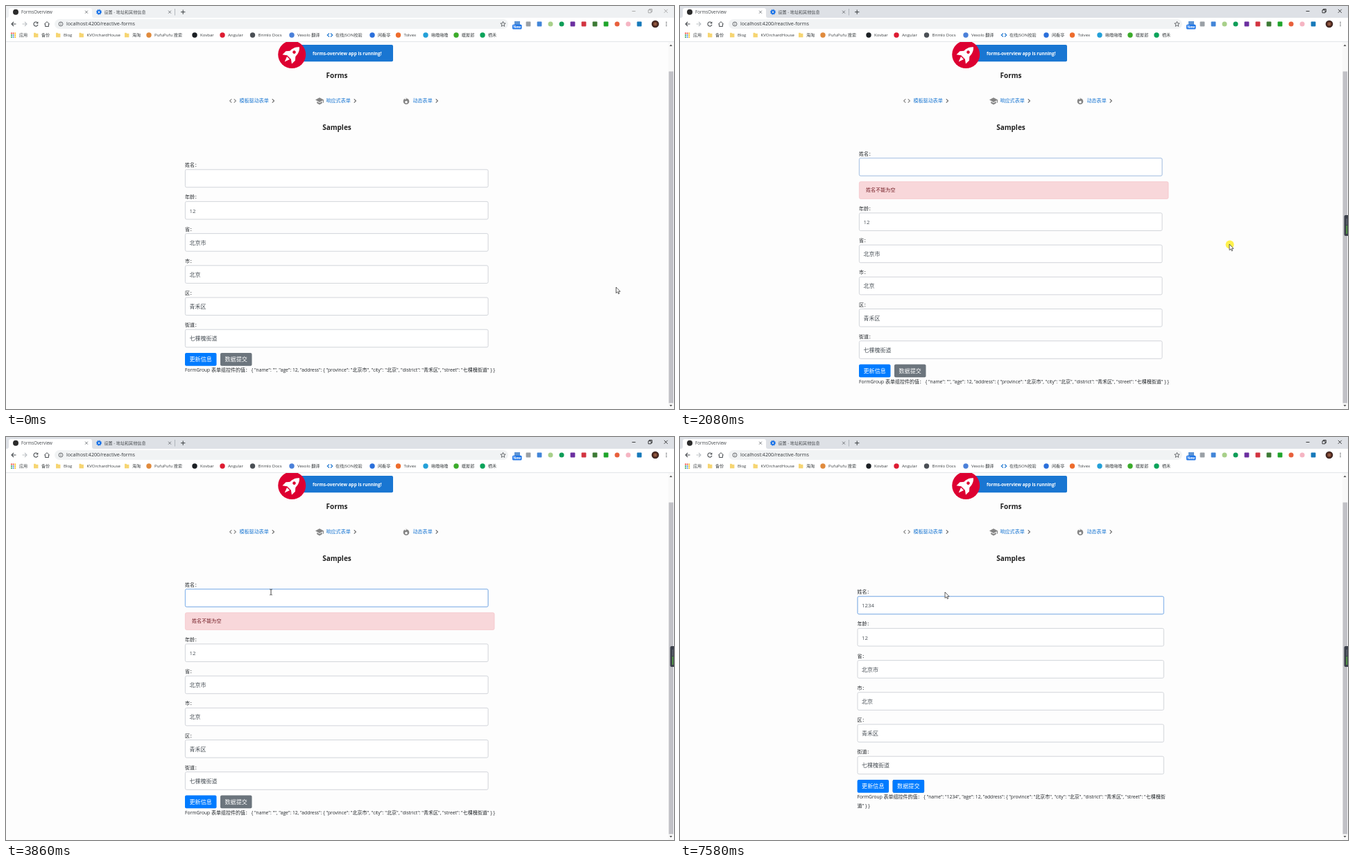
Recreate the animation shown at these times as an HTML page. Size 963x582 px, loop 8000 ms.

```html
<!DOCTYPE html>
<html lang="zh-CN">
<head>
<meta charset="utf-8">
<title>Reactive form validation</title>
<style>
  html, body { margin: 0; width: 100%; height: 100%; overflow: hidden; background: #fdfdfd; }
  svg { display: block; }
  text { font-family: "Open Sans", "Noto Sans", sans-serif; }
  .cjk { font-family: "Noto Sans CJK SC", "Noto Sans CJK", sans-serif; }
</style>
</head>
<body>
<svg id="stage" width="963" height="582" viewBox="0 0 963 582"></svg>
<script>
const LOOP = 8000;
const $ = id => document.getElementById(id);

// ---- drawing helpers -------------------------------------------------
const rect = (x, y, w, h, fill, more = '') =>
  `<rect x="${x}" y="${y}" width="${w}" height="${h}" fill="${fill}" ${more}/>`;
const disc = (x, y, r, fill, more = '') =>
  `<circle cx="${x}" cy="${y}" r="${r}" fill="${fill}" ${more}/>`;
const line = (d, color, width = 1, more = '') =>
  `<path d="${d}" fill="none" stroke="${color}" stroke-width="${width}" ${more}/>`;
const shape = (d, fill, more = '') => `<path d="${d}" fill="${fill}" ${more}/>`;
const at = (x, y, inner, id = '') => `<g ${id && `id="${id}"`} transform="translate(${x} ${y})">${inner}</g>`;

const runs = (str, cjkSize) => str.replace(/[\u3000-\u9fff\uff00-\uffef]+/g,
  s => `<tspan class="cjk" font-size="${cjkSize}">${s}</tspan>`);
// y is the middle of the line
const text = (x, y, str, size, cjkSize, fill, more = '') =>
  `<text x="${x}" y="${y + size * 0.37}" font-size="${size}" fill="${fill}" ${more}>${runs(str, cjkSize)}</text>`;

// ---- browser frame ---------------------------------------------------
function tabs() {
  const close = x => line(`M${x - 2} 6.7l4 4m0-4l-4 4`, '#5f6368', 0.8);
  return rect(0, 0, 963, 17, '#eff1f3', 'id="strip"') +
    shape('M1 17Q4 17 4 14V6Q4 3 7 3H121Q124 3 124 6V14Q124 17 127 17Z', '#fff') +
    disc(14, 8.7, 4, '#2b2b2b') +
    text(22, 8.7, 'FormsOverview', 6.2, 6.2, '#45494d') + close(116) +
    disc(134, 8.7, 2.2, 'none', 'stroke="#1a73e8" stroke-width="2"') +
    disc(134, 8.7, 3.6, 'none', 'stroke="#1a73e8" stroke-width="1" stroke-dasharray="1.4 1.43"') +
    text(141.5, 8.7, '设置 - 地址和其他信息', 6.1, 6.1, '#45494d') + close(236) +
    line('M243.5 4v9.5', '#9aa0a6', 0.7) +
    line('M252 8.7h6.4m-3.2-3.2v6.4', '#3c4043', 1) +
    `<g id="controls" fill="none" stroke-width=".8">
      <path d="M902.5 7.5h5M926 5.8h4v4h-4zM927.3 5.8v-1.3h4v4h-1.3M948.8 4.8l5 5m0-5l-5 5"/></g>`;
}

function toolbar() {
  const ink = '#4c5054';
  const extensions = [
    ['s', 753, '#9aa0a6'], ['s', 769, '#4285d8'], ['c', 785, '#a8d08a'], ['c', 801, '#0f9d58'],
    ['s', 817, '#6b2fa0'], ['s', 833, '#d23440'], ['s', 849, '#3d7a35'], ['s', 865, '#1fa52b'],
    ['c', 881, '#e8603c'], ['c', 897, '#f5b5c3'], ['s', 913, '#1779ba']];
  return rect(0, 17, 963, 18, '#fff') +
    rect(70, 19, 654, 14, '#f1f3f4', 'rx="7"') +
    line('M14.5 26H8m3-3l-3 3 3 3', ink, 1.1) +
    line('M23.5 26H30m-3-3l3 3-3 3', '#bdc1c6', 1.1) +
    line('M45.4 24A3.1 3.1 0 1 0 46 27', ink, 1.1) + shape('M46.4 22.4v3h-3z', ink) +
    line('M55.2 26.2L59 22.7l3.8 3.5M56.5 25.5v4h5v-4', ink, 1) +
    disc(79, 26, 3, 'none', `stroke="${ink}" stroke-width=".8"`) + line('M79 25.6v2m0-3.6v.9', ink, 0.8) +
    text(87, 25.8, 'localhost:4200/reactive-forms', 7.15, 7.15, '#33373b') +
    shape('M716.5 22.4l1 2.5 2.7.2-2.1 1.7.7 2.6-2.3-1.4-2.3 1.4.7-2.6-2.1-1.7 2.7-.2z', 'none',
      `stroke="${ink}" stroke-width=".8"`) +
    rect(733, 22, 8, 6, '#5e94d4') +
    rect(730, 26.8, 13.5, 6.6, '#1a73e8', 'rx="1.5"') +
    text(731.2, 30, 'New', 5, 5, '#fff', 'font-weight="700"') +
    extensions.map(([k, x, c]) => k === 's' ? rect(x - 3.4, 22.6, 6.8, 6.8, c, 'rx="1"') : disc(x, 26, 3.5, c)).join('') +
    disc(936, 26, 5.3, 'url(#photo)') +
    [23.4, 26, 28.6].map(y => disc(952, y, 0.75, ink)).join('');
}

function bookmarks() {
  const items = [
    ['folder', 43, '备份'], ['folder', 75, 'Blog'], ['folder', 108.5, 'KVOrchardHouse'], ['folder', 174, '海淘'],
    ['#e08a3c', 206, 'PufuPufu 搜索'], ['#1b1f23', 272, 'Kovbar'], ['#dd1b31', 312, 'Angular'],
    ['#4a4f55', 355.5, 'Brimlo Docs'], ['#4a80d9', 412, 'Vexolo 翻译'], ['json', 467, '在线JSON校验'],
    ['#2a6fdb', 528, '闲看亭'], ['#ee6c2c', 565.5, 'Tolvex'], ['#23a0d8', 605, '啾噜啾噜'],
    ['#3bab2a', 649, '暖屋郎'], ['#0aa35a', 687, '栖禾']];
  const icon = (kind, x) =>
    kind === 'folder' ? shape(`M${x - 3} 38.8h2.6l.9 1h2.9v5.4h-6.4z`, '#f6d572') :
    kind === 'json' ? line(`M${x - 1} 39.5l-2.7 2.5 2.7 2.5m2-5l2.7 2.5-2.7 2.5`, '#2d7fd3', 1.3) :
    disc(x, 42, 3.7, kind);
  const dots = ['#ea4335', '#ea4335', '#fbbc05', '#34a853', '#4285f4', '#fbbc05', '#34a853', '#4285f4', '#fbbc05'];
  return rect(0, 35, 963, 17, '#fff') + line('M0 51.5H963', '#dcdfe2', 0.8) +
    dots.map((c, i) => rect(7 + i % 3 * 2.7, 38.5 + Math.floor(i / 3) * 2.7, 1.8, 1.8, c)).join('') +
    text(19, 42.2, '应用', 6.1, 6.1, '#3c4043') +
    items.map(([k, x, s]) => icon(k, x) + text(x + 8, 42.2, s, 6.05, 6.1, '#3c4043')).join('');
}

// ---- page ------------------------------------------------------------
function header() {
  const grey = '#858585', blue = '#1976d2';
  const chevron = x => line(`M${x - 1.3} 134.3l2.7 2.7-2.7 2.7`, '#666', 1.1);
  const link = (x, s) => text(x, 136.8, s, 7, 7.05, blue) + chevron(x + s.length * 7.05 + 6.3);
  const title = (y, s) => text(477, y, s, 10, 10, '#222', 'font-weight="700" text-anchor="middle"');
  const rocket = shape('M0-15C6-10 6.8-2 4.6 6H-4.6C-6.8-2-6-10 0-15Z', '#fff') +
    shape('M-5.2-2L-9.5 3v7l5.5-4zM5.2-2L9.5 3v7l-5.5-4zM-2.8 7.5H2.8L0 15z', '#fff') + disc(0, -4.5, 2.3, '#dd0031');
  return rect(412, 56, 146, 24.3, blue, 'rx="2"') +
    `<g clip-path="url(#page)">${disc(412.2, 70.1, 20, '#dd0031')}</g>` +
    `<g transform="translate(412.3 69.8) rotate(45)">${rocket}</g>` +
    text(442, 68.3, 'forms-overview app is running!', 6.45, 6.45, '#fff', 'font-weight="700"') +
    title(100, 'Forms') + title(175, 'Samples') +
    line('M325.3 134.3l-2.7 2.7 2.7 2.7m3.4-5.4l2.7 2.7-2.7 2.7', grey, 1.1) +
    shape('M446 135.5l6-3.3 6 3.3v4.3h-1.1v-3.6l-4.9 2.8zM448.2 138l3.8 2.1 3.8-2.1v2.3l-3.8 2.1-3.8-2.1z', grey) +
    shape('M577 131.5C577 134 578 134.5 578.8 133.4 580.5 134.6 581.3 136.4 581.3 137.8A4.3 4.3 0 0 1 572.7 137.8C572.7 135.6 573.6 134.4 574.6 133.5 574.6 135 576 135.4 576.5 134.4Z', grey) +
    disc(577, 138.7, 1.8, '#fdfdfd') +
    link(336.5, '模板驱动表单') + link(461.5, '响应式表单') + link(586.5, '动态表单');
}

const scrollbar = rect(955, 52, 8, 530, '#f8f8f8') + rect(955.5, 94.5, 6.5, 479, '#c1c1c6') +
  shape('M956.5 58l2-2.4 2 2.4zM956.5 576l2 2.4 2-2.4z', '#555');

const panel = `<g id="panel">${rect(957.5, 302, 8, 30, '#3c414b', 'rx="2"')}${
  rect(960.5, 307, 1.2, 9, '#6b717c')}${rect(960.5, 317, 1.4, 12, '#5fb547')}</g>`;

// ---- form ------------------------------------------------------------
const PITCH = 46.2, ERROR_GAP = 33;
const DISTRICT = '青禾区', STREET = '七棵槐街道';
const FIELDS = [['姓名', ''], ['年龄', '12'], ['省', '北京市'], ['市', '北京'], ['区', DISTRICT], ['街道', STREET]];

const field = ([label, value], i) => at(0, i * PITCH,
  text(0, 0, label + '：', 6.7, 7, '#212529') +
  rect(0.4, 6.4, 437, 25.6, '#fff', 'class="box" rx="2" stroke="#cdd1d6" stroke-width=".9"') +
  text(6.5, 19.7, value, 7.8, 8, '#495057', i ? '' : 'id="name"'));

const button = (x, s, fill) => rect(x, 271.2, 45.5, 18.8, fill, 'rx="2"') + text(x + 6.5, 280.6, s, 7.6, 8.1, '#fff');

const form = at(0, 0,
  field(FIELDS[0], 0) +
  rect(0.4, 6.4, 437, 25.6, 'none', 'id="focus" class="box" rx="2" stroke="#78aff2" stroke-width=".9"') +
  rect(0, 14.3, 0.8, 10.8, '#222', 'id="caret"') +
  `<g id="alert">${rect(0.4, 40.5, 446, 24.6, '#f8d7da', 'id="alertBox" rx="2" stroke="#f5c6cb" stroke-width=".8"')}${
    text(10, 52.7, '', 6.6, 7.1, '#721c24', 'id="alertText"')}</g>` +
  at(0, 0, FIELDS.slice(1).map((f, i) => field(f, i + 1)).join('') +
    button(0, '更新信息', '#007bff') +
    button(51, '数据提交', '#6c757d') +
    `<g id="ready">${button(51, '数据提交', '#007bff')}</g>` +
    text(0, 296.2, '', 6.7, 7, '#212529', 'id="json"') +
    text(0, 308.4, '', 6.7, 7, '#212529', 'id="jsonTail"'), 'rest'), 'form');

const pointer = `<g id="pointer">
  <circle id="halo" r="6" cx=".6" cy=".6" fill="#ffee2e" opacity=".85"/>
  <path id="arrow" d="M0 0V8.6L2 6.8 3.4 9.8 4.7 9.2 3.4 6.3H6Z" fill="#fff" stroke="#222" stroke-width=".7"/>
  <path id="beam" d="M-1.8-4H-.5L0-3.5.5-4H1.8M0-3.5V3.5M-1.8 4H-.5L0 3.5.5 4H1.8" fill="none" stroke="#333" stroke-width=".9"/></g>`;

$('stage').innerHTML = `<defs>
  <clipPath id="page"><rect y="52" width="963" height="530"/></clipPath>
  <radialGradient id="photo"><stop offset="0" stop-color="#b0714f"/><stop offset=".6" stop-color="#5a2f24"/>
    <stop offset="1" stop-color="#2a1a18"/></radialGradient></defs>` +
  rect(0, 0, 963, 582, '#fdfdfd') + tabs() + toolbar() + bookmarks() + header() + scrollbar + form + panel + pointer;

// ---- timeline --------------------------------------------------------
const EMPTY = '姓名不能为空', SHORT = '姓名信息不能少于 4 个字符长度';
// tail: how many closing characters wrap; blink: start of the caret's cycle
const STATES = [
  { t: 0,    x: 258,   y: 229.8, name: '', tail: 0, error: '' },
  { t: 1150, x: 258,   y: 229.8, name: '', tail: 0, error: '', blink: 1150 },
  { t: 2010, x: 258,   y: 213.3, name: '', tail: 0, error: EMPTY },
  { t: 3330, x: 258,   y: 213.3, name: '', tail: 0, error: EMPTY, blink: 3320 },
  { t: 4410, x: 256.2, y: 213.3, name: '1', tail: 0, error: SHORT, blink: 4410 },
  { t: 4720, x: 255.6, y: 207.3, name: '12', tail: 1, error: SHORT, blink: 4720 },
  { t: 4950, x: 255.6, y: 207.3, name: '123', tail: 3, error: SHORT, blink: 4870 },
  { t: 7030, x: 255.6, y: 223.8, name: '1234', tail: 6, error: '', blink: 7030 }];
const FOCUS = [[1150, 2010], [3330, LOOP + 999]];
const CLICKS = [[1150, 1310], [2010, 2250], [3330, 3480]];
const PATH = [
  [0, 879.5, 406], [150, 868, 406], [250, 825, 403], [350, 776, 387], [460, 717, 363], [640, 583, 316],
  [830, 487, 281], [920, 450, 273], [1080, 431, 251], [1390, 431, 251], [1560, 684, 305], [1700, 740, 326],
  [1940, 792, 344], [2330, 792, 344], [2700, 600, 300], [2950, 430, 236], [3150, 382, 224], [LOOP, 382, 224]];
const TICK = 77, BLINK = 540, FADE = 150;

const clamp = v => Math.max(0, Math.min(1, v));
const stateAt = t => STATES.filter(s => s.t <= t).pop();
const within = (t, spans) => spans.some(([a, b]) => t >= a && t < b);
const show = (id, on) => $(id).setAttribute('visibility', on ? 'visible' : 'hidden');
const move = (id, x, y) => $(id).setAttribute('transform', `translate(${x} ${y})`);

function pointerAt(t) {
  const q = Math.max(0, 70 + TICK * Math.floor((t - 70) / TICK));
  const i = Math.max(1, PATH.findIndex(p => p[0] > q));
  const [t0, x0, y0] = PATH[i - 1], [t1, x1, y1] = PATH[i];
  const k = (q - t0) / (t1 - t0);
  return [x0 + (x1 - x0) * k, y0 + (y1 - y0) * k];
}

function overInput(x, y, s) {
  if (x < s.x || x > s.x + 440) return false;
  return FIELDS.some((_, i) => {
    const top = s.y + 6 + i * PITCH + (i && s.error ? ERROR_GAP : 0);
    return y >= top && y <= top + 26;
  });
}

function drawState(s) {
  const width = 2 * (481.2 - s.x);
  move('form', s.x, s.y);
  move('rest', 0, s.error ? ERROR_GAP : 0);
  document.querySelectorAll('.box').forEach(b => b.setAttribute('width', width * 0.98 - 0.8));
  $('alertBox').setAttribute('width', width - 0.8);
  $('name').textContent = s.name;
  $('alertText').innerHTML = runs(s.error, 7.1);
  show('alert', s.error);
  const json = `FormGroup 表单组控件的值： { "name": "${s.name}", "age": 12, "address": { "province": "北京市", ` +
    `"city": "北京", "district": "${DISTRICT}", "street": "${STREET}" } }`;
  const cut = json.length - s.tail;
  $('json').innerHTML = runs(json.slice(0, cut), 7);
  $('jsonTail').innerHTML = runs(json.slice(cut), 7);
  $('caret').setAttribute('x', 6.4 + s.name.length * 4.46);
}

let shown;
function draw(t) {
  const s = stateAt(t);
  if (s !== shown) drawState(shown = s);

  const active = t >= FOCUS[0][0];
  $('strip').setAttribute('fill', active ? '#dee1e6' : '#eff1f3');
  $('controls').setAttribute('stroke', active ? '#111' : '#999');
  show('panel', active);

  const glow = Math.max(...FOCUS.map(([a, b]) => Math.min(clamp((t - a) / FADE), 1 - clamp((t - b) / FADE))));
  $('focus').setAttribute('opacity', glow);
  $('ready').setAttribute('opacity', clamp((t - 7030) / FADE));
  show('caret', s.blink !== undefined && Math.floor((t - s.blink) / BLINK) % 2 === 0);

  const [x, y] = pointerAt(t);
  const beam = overInput(x, y, stateAt(Math.max(0, t - 90)));
  move('pointer', x, y);
  show('beam', beam);
  show('arrow', !beam);
  show('halo', within(t, CLICKS));
}

const start = performance.now();
function tick() {
  draw((performance.now() - start) % LOOP);
  requestAnimationFrame(tick);
}
tick();
</script>
</body>
</html>
```
